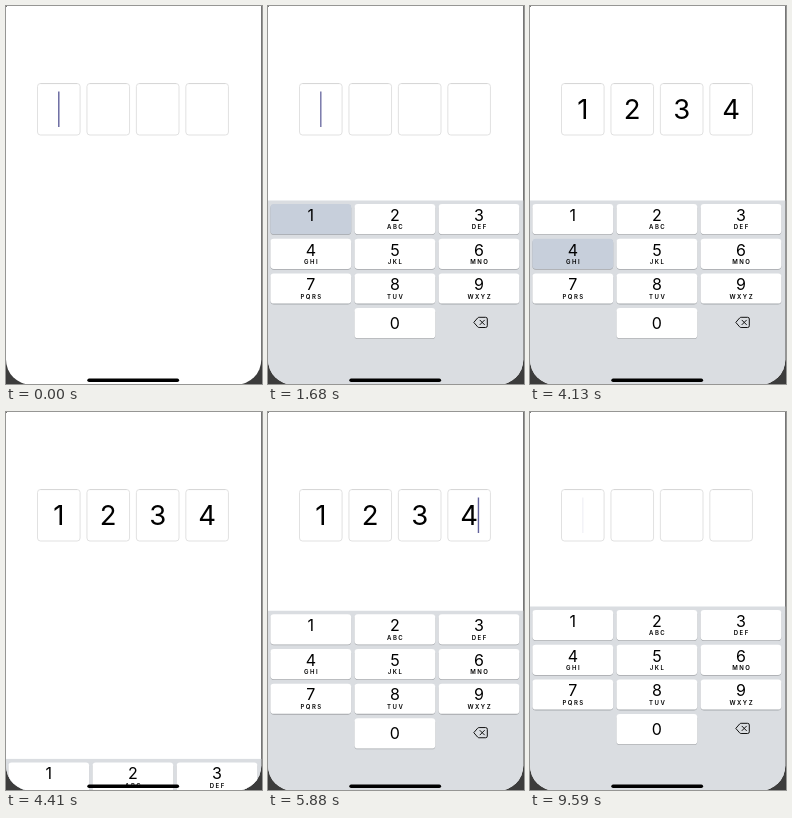
Recreate the animation shown at these times as an HTML page. Size 256x378 px, loop 9.8 s.

```html
<!DOCTYPE html>
<html lang="en">
<head>
<meta charset="utf-8">
<title>PIN entry</title>
<style>
  html, body { margin: 0; width: 100%; height: 100%; overflow: hidden; background: #3c3c3c; }
  svg { display: block; width: 256px; height: 378px; }
  text { font-family: Inter, Roboto, sans-serif; text-anchor: middle; fill: #000; }
  .digit { font-size: 27.5px; }
  .number { font-size: 16px; }
  .letters { font-size: 6px; font-weight: 600; letter-spacing: 1.5px; }
</style>
</head>
<body>
<svg id="stage" viewBox="0 0 256 378">
  <clipPath id="screen"><rect x="0" y="-40" width="255.3" height="418.6" rx="25"/></clipPath>
  <g clip-path="url(#screen)">
    <rect width="256" height="378" fill="#fff"/>
    <g id="boxes"></g>
    <rect id="caret" y="85.5" width="1.4" height="35.5" fill="#62629c"/>
    <g id="keyboard"><rect y="194.5" width="256" height="190" fill="#dadde1"/></g>
    <rect x="81.3" y="372.6" width="91.8" height="3.5" rx="1.75"/>
  </g>
  <rect width="1" height="1" fill="#777"/>
</svg>
<script>
const LOOP = 9800, STEP = 70, FADE = 110, KEYBOARD_HEIGHT = 184;

// When each digit is in its box, in ms.
const digitSpans = [[1890, 8820], [2590, 8050], [3430, 7280], [4130, 6580]];

// When each key is held down.
const presses = {
  1: [[1610, 1960]], 2: [[2450, 2660]], 3: [[3220, 3500]], 4: [[3990, 4200]],
  del: [[6580, 6650], [6930, 7070], [7280, 7420], [7630, 7770], [8050, 8190], [8400, 8540], [8820, 8960]],
};

const boxCenter = i => 52.8 + i * 49.45;
const afterDigit = i => boxCenter(i) + [6.5, 8.5, 8.5, 9.3][i];

// Caret states; each lasts until the next one starts.
const caretStates = [
  { on: 0, off: 90, x: boxCenter(0) },
  { on: 590, off: 1090, x: boxCenter(0), fadeIn: true },
  { on: 1580, x: boxCenter(0), fadeIn: true },
  { on: 1890, x: boxCenter(1) },
  { on: 2590, off: 3110, x: boxCenter(2) },
  { on: 3430, off: 3960, x: boxCenter(3) },
  { on: 4130, off: 0, x: boxCenter(3) },
  { on: 5600, off: 6190, x: afterDigit(3) },
  { on: 6580, x: boxCenter(3) },
  { on: 7000, x: afterDigit(2) },
  { on: 7280, off: 7610, x: boxCenter(2) },
  { on: 7700, x: afterDigit(1) },
  { on: 8050, x: boxCenter(1) },
  { on: 8540, x: afterDigit(0) },
  { on: 8820, off: 9490, x: boxCenter(0) },
];

const byId = id => document.getElementById(id);
const boxes = byId('boxes'), keyboard = byId('keyboard'), caret = byId('caret');

function add(parent, tag, attributes, text = '') {
  const node = document.createElementNS('http://www.w3.org/2000/svg', tag);
  for (const name in attributes) node.setAttribute(name, attributes[name]);
  node.textContent = text;
  parent.append(node);
  return node;
}

const digits = digitSpans.map((span, i) => {
  const x = boxCenter(i);
  add(boxes, 'rect', { x: x - 21.3, y: 77.5, width: 42.6, height: 51.5, rx: 3, fill: '#fff', stroke: '#dedede', 'stroke-width': 0.9 });
  add(boxes, 'path', { d: `M${x - 18.5} 77.6h37`, stroke: '#d2d2d2', 'stroke-width': 0.7 });
  return add(boxes, 'text', { x, y: 113.3, class: 'digit' }, i + 1);
});

const keys = {};
const letters = ['', 'ABC', 'DEF', 'GHI', 'JKL', 'MNO', 'PQRS', 'TUV', 'WXYZ'];

function addKey(label, column, row) {
  const x = 2.4 + column * 84.1, y = 198 + row * 34.7, center = x + 40.4;
  const shape = { x, width: 80.8, height: 30.2, rx: 3.4 };
  add(keyboard, 'rect', { ...shape, y: y + 0.8, fill: '#a4a7ab' });
  keys[label] = add(keyboard, 'rect', { ...shape, y });
  add(keyboard, 'text', { x: center, y: y + (label ? 16.8 : 20.7), class: 'number' }, label);
  add(keyboard, 'text', { x: center + 0.75, y: y + 25.3, class: 'letters' }, letters[label - 1] || '');
}
for (let n = 1; n <= 9; n++) addKey(n, (n - 1) % 3, Math.floor((n - 1) / 3));
addKey(0, 1, 3);

const delShape = add(keyboard, 'path', {
  d: 'M205.8 316.4L209.6 312Q210.2 311.3 211.1 311.3H217.6Q219.3 311.3 219.3 313V319.8Q219.3 321.5 217.6 321.5H211.1Q210.2 321.5 209.6 320.8Z',
  stroke: '#111', 'stroke-width': 1, 'stroke-linejoin': 'round',
});
const delCross = add(keyboard, 'path', { d: 'M212 314.2l4.4 4.4m0-4.4l-4.4 4.4', 'stroke-width': 1, 'stroke-linecap': 'round' });

const within = (t, [start, end]) => t >= start && t < end;
const isHeld = (key, t) => (presses[key] || []).some(span => within(t, span));
const clamp = v => Math.min(1, Math.max(0, v));

// Remaining distance of a critically damped spring, from 1 to 0.
function spring(ms) {
  const x = Math.max(0, ms) * 0.01826;
  return (1 + x) * Math.exp(-x);
}

function keyboardOffset(t) {
  if (t < 4235) return spring(t - 40);
  if (t < 5570) return 1 - spring(t - 4235);
  return spring(t - 5570);
}

function draw(t) {
  digits.forEach((digit, i) => digit.setAttribute('opacity', +within(t, digitSpans[i])));

  const { on, off = Infinity, x, fadeIn } = caretStates.findLast(state => state.on <= t);
  const rise = fadeIn ? clamp((t - on) / FADE) : 1;
  caret.setAttribute('x', x - 0.7);
  caret.setAttribute('opacity', rise * clamp(1 - (t - off) / FADE));

  keyboard.setAttribute('transform', `translate(0 ${KEYBOARD_HEIGHT * keyboardOffset(t)})`);
  for (const label in keys) keys[label].setAttribute('fill', isHeld(label, t) ? '#c7cfdb' : '#fff');
  const deleting = isHeld('del', t);
  delShape.setAttribute('fill', deleting ? '#000' : 'none');
  delCross.setAttribute('stroke', deleting ? '#fff' : '#111');
}

const startTime = performance.now();
function tick() {
  const t = (performance.now() - startTime) % LOOP;
  draw(Math.floor(t / STEP) * STEP);
  requestAnimationFrame(tick);
}
tick();
</script>
</body>
</html>
```
